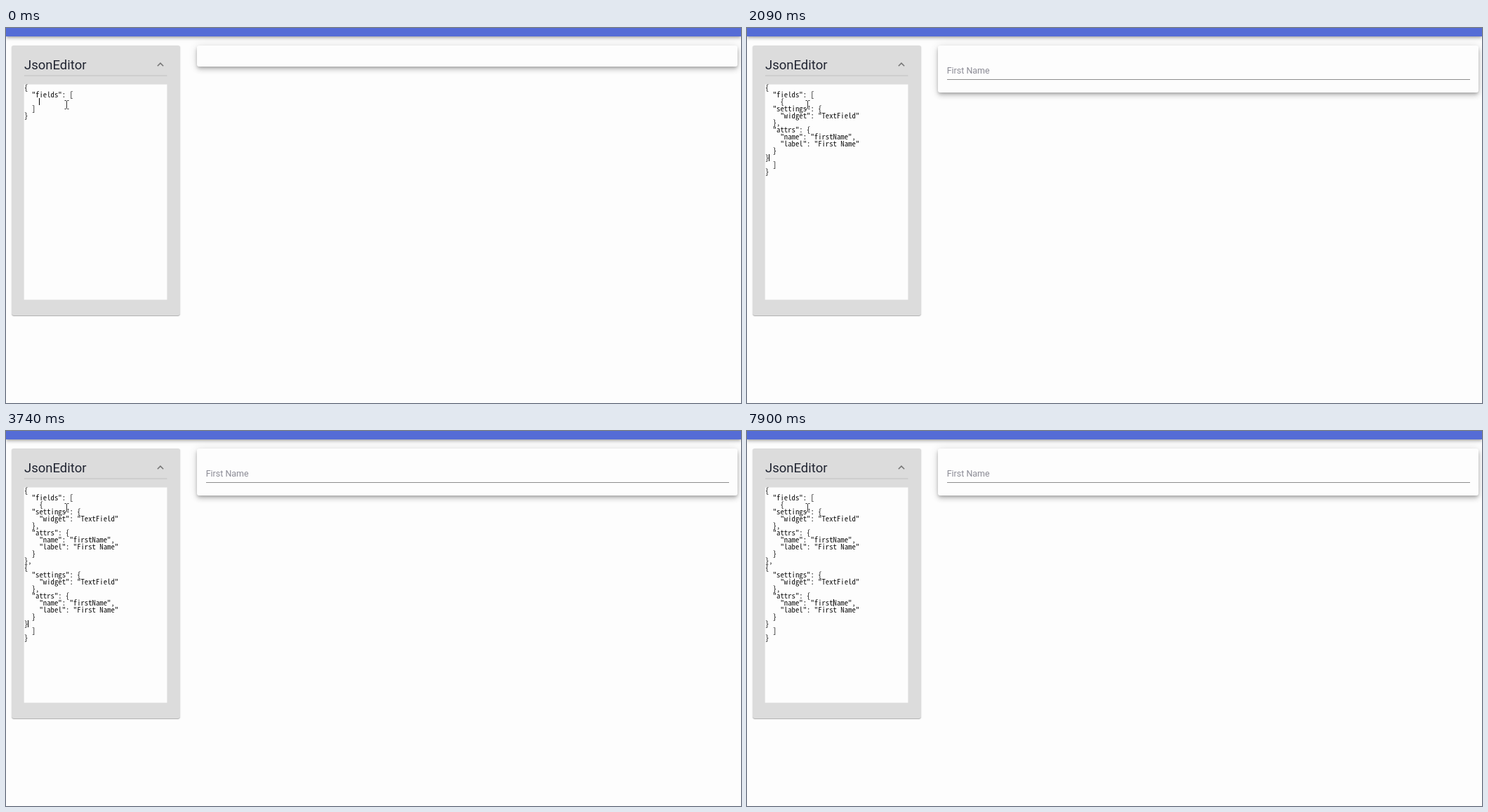
These frames come from a looping animation (1047x535 px, 8000 ms). An HTML page:

```html
<!DOCTYPE html>
<html lang="en">
<head>
<meta charset="utf-8">
<title>JsonEditor</title>
<style>
  html, body { margin: 0; width: 100%; height: 100%; overflow: hidden; background: #fdfdfd; }
  #stage { position: relative; width: 1047px; height: 535px; overflow: hidden; background: #fdfdfd; }
  #stage > * { position: absolute; }
  #bar {
    left: 0; top: 0; width: 1047px; height: 12px; background: #556cd6;
    box-shadow: 0 1.6px 3px -.8px rgba(0,0,0,.2), 0 3px 4px rgba(0,0,0,.14), 0 .8px 8px rgba(0,0,0,.12);
  }
  #panel {
    left: 8px; top: 25px; width: 240px; height: 385px; border-radius: 3px; background: #dcdcdc;
    box-shadow: 0 1.6px .8px -.8px rgba(0,0,0,.2), 0 .8px .8px rgba(0,0,0,.14), 0 .8px 2.4px rgba(0,0,0,.12);
  }
  #form {
    left: 272px; top: 25px; width: 770px; height: 30px; border-radius: 3px; background: #fdfdfd;
    box-shadow: 0 2.4px 4px -.8px rgba(0,0,0,.22), 0 4.7px 7.8px rgba(0,0,0,.14), 0 .8px 13px rgba(0,0,0,.12);
  }
  svg { left: 0; top: 0; }
  text { font-family: Roboto, sans-serif; white-space: pre; }
  #code text { fill: #111; font-family: "Noto Sans Mono CJK JP", "Noto Sans Mono", monospace; }
  #error text { fill: #f00; font-size: 10.95px; font-weight: 700; }
</style>
</head>
<body>
<div id="stage">
  <div id="bar"></div>
  <div id="panel"></div>
  <div id="form"></div>
  <svg width="1047" height="535" viewBox="0 0 1047 535">
    <text x="26" y="59" font-size="18.5" fill="#202431">JsonEditor</text>
    <path transform="translate(210.6 42.8) scale(.78)" fill="#757575"
      d="M12 8l-6 6 1.41 1.41L12 10.83l4.59 4.58L18 14z"/>
    <rect x="26" y="67.5" width="203.5" height="1" fill="#c2c2c2"/>
    <g id="error">
      <text x="26" y="91.5">ErrorMessage:Unexpected token ] in</text>
      <text x="26" y="107" id="place"></text>
    </g>
    <g id="field">
      <text x="284.7" y="65.4" font-size="12.47" fill="#8b8b95">First Name</text>
      <rect x="285" y="73" width="745" height="1" fill="#8d8d8d"/>
    </g>
    <g id="editor">
      <rect x="25.7" y="80.5" width="203.7" height="307.2" fill="#fdfdfd"/>
      <g id="code"></g>
      <rect id="caret" width="1" height="10" fill="#000"/>
    </g>
    <path d="M83.5 103.5H85.5L86.5 104.5L87.5 103.5H89.5M86.5 104V114.5M83.5 115.5H85.5L86.5 114.5L87.5 115.5H89.5"
      fill="none" stroke="#333"/>
  </svg>
</div>
<script>
const LOOP = 8000, LEFT = 26, TOP = 80, ROW = 10, COL = 5.37, SHIFT = 37;
const BLINK = 1000, LIT = 540;
const $ = id => document.getElementById(id);

const block = `{
  "settings": {
    "widget": "TextField"
  },
  "attrs": {
    "name": "firstName",
    "label": "First Name"
  }
}`;

// states in order of time; each edit leaves the caret behind the inserted text
const states = [];
const last = () => states[states.length - 1];

function edit(time, added, error, blinkFrom = time) {
  const body = (last()?.body ?? '') + added;
  const rows = body.split('\n');
  const lines = `{\n  "fields": [\n${body}\n  ]\n}`.split('\n');
  states.push({ time, blinkFrom, body, lines, error, row: rows.length + 1, col: rows.at(-1).length });
}

// presses a key several times, evenly between two moments
function press(key, count, from, to) {
  for (let i = 0; i < count; i++) {
    const time = from + (to - from) * i / (count - 1);
    states.push({ ...last(), ...key(last()), time, blinkFrom: time });
  }
}
const up = s => ({ row: s.row - 1 });
const down = s => ({ row: s.row + 1 });
const left = s => ({ col: s.col - 1 });
const nextWord = s => ({
  col: s.col + s.lines[s.row].slice(s.col).match(/^\W*\w+/)[0].length
});

edit(0, '    ', 0, -250);
edit(1090, block);
edit(2490, ',', 142);
edit(3420, '\n', 143, 3570 - BLINK);
edit(3740, block);
press(up, 6, 4520, 5600);
press(down, 3, 6090, 6320);
press(nextWord, 2, 6700, 6850);
press(left, 4, 7340, 7900);

const show = (el, on) => { el.style.display = on ? '' : 'none'; };

// choose the size at which one character fills one column
function codeSize() {
  const ctx = document.createElement('canvas').getContext('2d');
  ctx.font = '100px "Noto Sans Mono CJK JP", "Noto Sans Mono", monospace';
  return COL * 1000 / ctx.measureText('0000000000').width;
}
$('code').style.fontSize = codeSize() + 'px';

function setText({ lines, body, error }) {
  $('code').replaceChildren(...lines.map((line, i) => {
    const el = document.createElementNS('http://www.w3.org/2000/svg', 'text');
    el.setAttribute('x', LEFT);
    el.setAttribute('y', TOP + i * ROW + 9);
    el.textContent = line;
    return el;
  }));
  const dy = error ? SHIFT : 0;
  show($('error'), error);
  $('place').textContent = 'JSON at position ' + (error || '');
  $('editor').setAttribute('transform', `translate(0 ${dy})`);
  $('panel').style.height = 385 + dy + 'px';
  const filled = body.trim() !== '';
  show($('field'), filled);
  $('form').style.height = (filled ? 67 : 30) + 'px';
}

let shown;
function draw() {
  const t = performance.now() % LOOP;
  const state = states.findLast(s => s.time <= t);
  if (state.lines !== shown) setText(state), shown = state.lines;
  $('caret').setAttribute('x', Math.round(LEFT + state.col * COL));
  $('caret').setAttribute('y', TOP + state.row * ROW);
  show($('caret'), (t - state.blinkFrom) % BLINK < LIT);
  requestAnimationFrame(draw);
}
draw();
</script>
</body>
</html>
```
